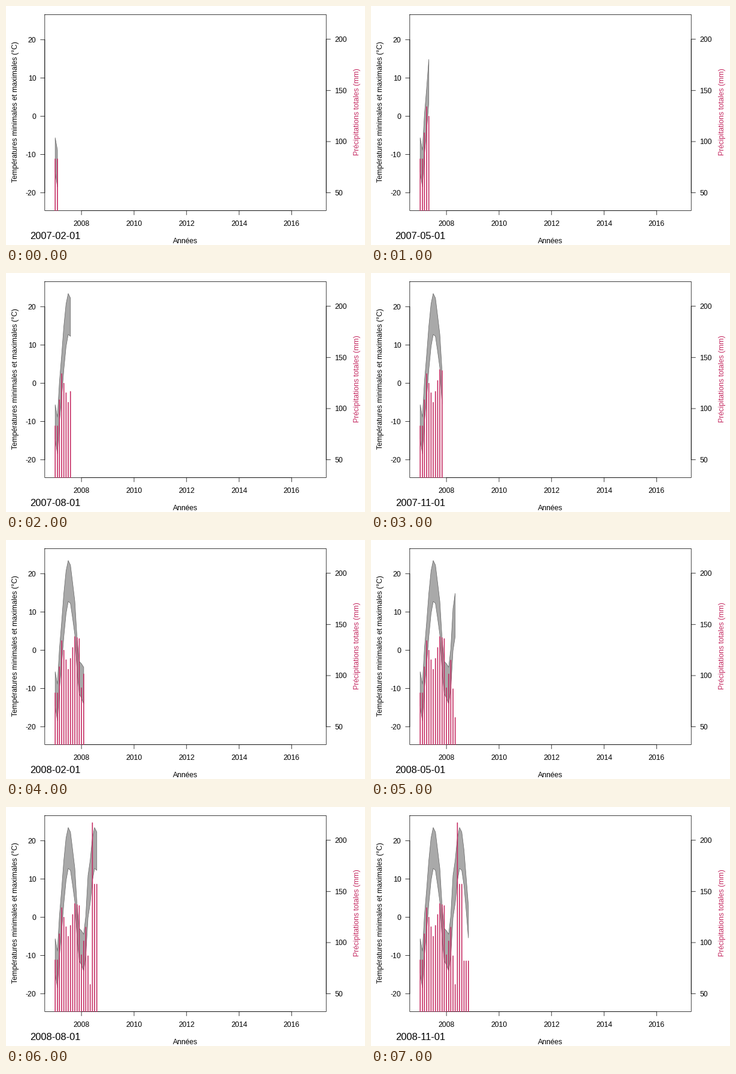
A matplotlib script for the animation above (8000 ms loop, 600 by 400 pixels).

```python
import numpy as np
import matplotlib.pyplot as plt
from matplotlib.animation import FuncAnimation

W, H, DPI = 600, 400, 100
PX = 72 / DPI
LEFT, RIGHT, TOP, BOTTOM = 64.8, 535.2, 14.4, 342.4
PINK = "#c42860"
STEPS, COUNT = 8, 23

plt.rcParams["font.family"] = "Liberation Sans"
plt.rcParams["path.snap"] = False

START = np.datetime64("2007-01-01")
SPAN = (np.datetime64("2016-12-01") - START).astype(int)


def x_date(day):
    pad = (RIGHT - LEFT) * 0.04 / 1.08
    days = (np.datetime64(day, "D") - START).astype(int)
    return LEFT + pad + days / SPAN * (RIGHT - LEFT - 2 * pad)


def y_temp(t):
    return 184.5 - 6.41 * np.asarray(t)


def y_rain(mm):
    return 312.6 - 1.713 * (np.asarray(mm) - 50)


def season(mean, swing, lag):
    """Yearly temperature wave, coldest `lag` months after January."""
    return mean - swing * np.cos((month - lag) * np.pi / 6)


month = np.arange(COUNT)
dates = np.datetime64("2007-01") + month
xs = np.array([x_date(d) for d in dates])

# Unusually cold or mild months shift both temperature curves
weather = np.zeros(COUNT)
for m, shift in {1: -4.4, 9: 2.3, 12: 2.1, 15: 3.5}.items():
    weather[m] = shift
high = y_temp(season(8.9, 14.6, 0.2) + weather)
low = y_temp(season(-0.9, 13.9, 0.37) + weather)

# Turning points of the monthly rain, straight in between
rain_turns = {1: 83, 3: 134, 6: 106, 9: 138, 11: 136, 12: 88,
              14: 115, 16: 59, 17: 217, 18: 157, 19: 157, 20: 82}
rain = y_rain(np.interp(month, list(rain_turns), list(rain_turns.values())))

fig = plt.figure(figsize=(W / DPI, H / DPI), dpi=DPI, facecolor="white")
ax = fig.add_axes([0, 0, 1, 1])
ax.set_xlim(0, W)
ax.set_ylim(H, 0)
ax.axis("off")


def line(x, y):
    ax.plot(x, y, color="black", lw=0.75 * PX, solid_capstyle="round", zorder=1)


def label(x, y, text, size=12.2, ha="center", color="black", angle=0):
    return ax.text(x, y, text, fontsize=size * PX, ha=ha, va="baseline",
                   color=color, rotation=angle, rotation_mode="anchor")


line([LEFT, RIGHT, RIGHT, LEFT, LEFT], [TOP, TOP, BOTTOM, BOTTOM, TOP])

years = range(2008, 2017, 2)
year_x = [x_date(f"{year}-01-01") for year in years]
line([year_x[0], year_x[-1]], [BOTTOM, BOTTOM])
for year, x in zip(years, year_x):
    line([x, x], [BOTTOM, BOTTOM + 7.2])
    label(x, 368.2, str(year))


def side_axis(x, out, values, scale, ha):
    ys = scale(values)
    line([x, x], [ys[0], ys[-1]])
    for value, y in zip(values, ys):
        line([x, x + 7.2 * out], [y, y])
        label(x + 14.4 * out, y + 4.3, str(value), ha=ha)


side_axis(LEFT, -1, range(-20, 21, 10), y_temp, "right")
side_axis(RIGHT, 1, range(50, 201, 50), y_rain, "left")

mid_x, mid_y = (LEFT + RIGHT) / 2, (TOP + BOTTOM) / 2 - 1
label(mid_x, 397, "Années")
label(19.2, mid_y, "Températures minimales et maximales (°C)", angle=90)
label(590.2, mid_y, "Précipitations totales (mm)", color=PINK, angle=90)
date = label(xs[0], 390, "", size=16.5)

band, = ax.fill([], [], facecolor="#a9a9a9", edgecolor="#666666",
                lw=0.75 * PX, joinstyle="round", zorder=2)
bars = ax.vlines([], [], [], color=PINK, lw=1.6 * PX, capstyle="round", zorder=3)


def draw(step):
    n = 2 + 3 * step
    there, back = slice(0, n), slice(n - 1, None, -1)
    band.set_xy(np.column_stack([np.r_[xs[there], xs[back]],
                                 np.r_[high[there], low[back]]]))
    bars.set_segments([[(x, BOTTOM), (x, y)] for x, y in zip(xs[there], rain)])
    date.set_text(f"{dates[n - 1]}-01")
    return band, bars, date


ani = FuncAnimation(fig, draw, frames=STEPS, interval=1000, repeat=True,
                    repeat_delay=0, blit=False)
plt.show()
```
